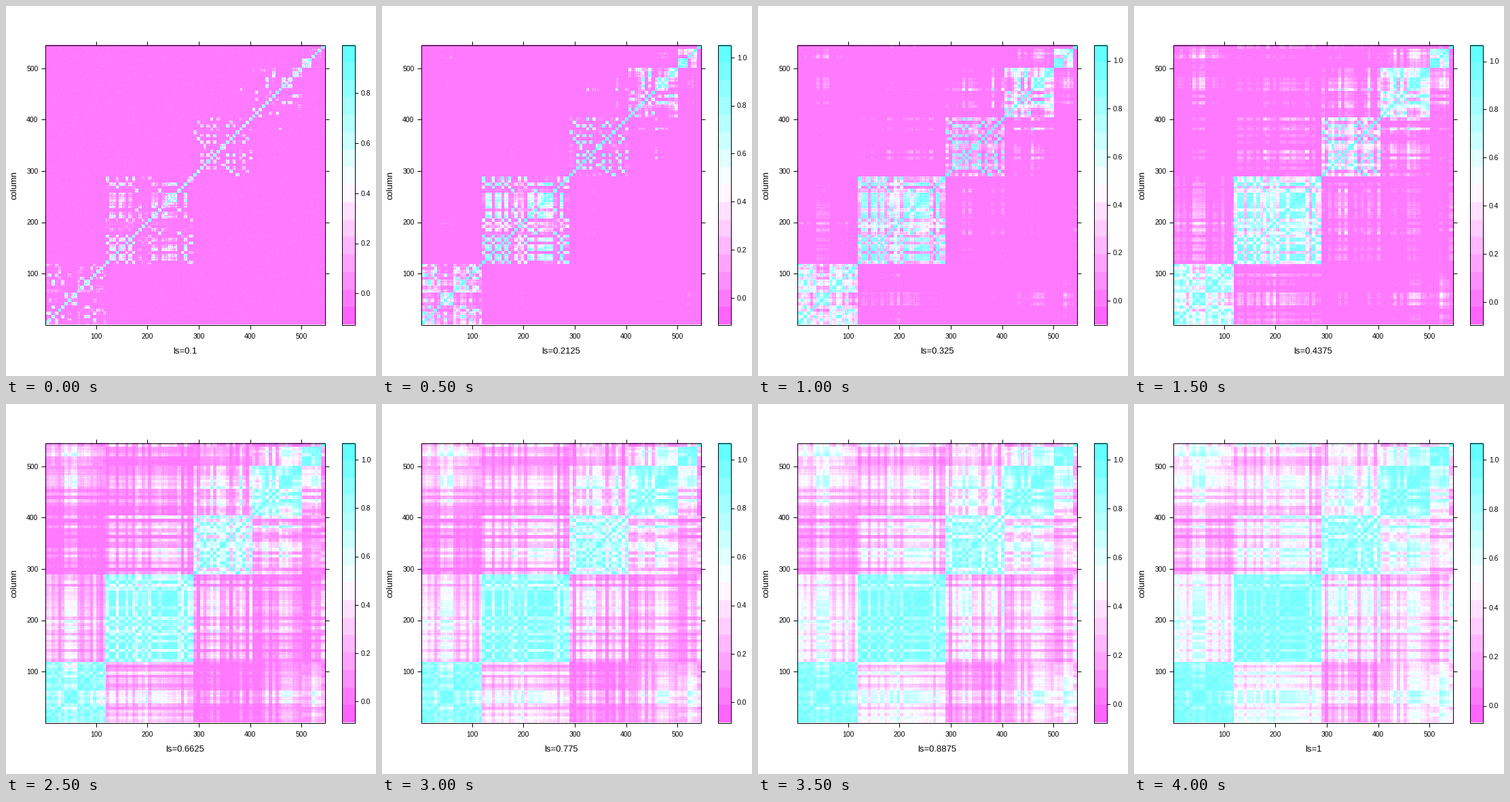
Recreate the animation shown at these times as a matplotlib script. Size 545 px wide and 545 px high, loop 4.5 s.

```python
import numpy as np
import matplotlib
import matplotlib.pyplot as plt
from matplotlib.animation import FuncAnimation
from matplotlib.patches import Rectangle

matplotlib.rcParams["font.family"] = "Liberation Sans"

SIZE, DPI = 545, 100
N = 545                      # samples in the kernel matrix
FRAMES, STEP = 9, 500
LEFT, RIGHT, TOP, BOTTOM = 57.5, 469.5, 57.5, 469.5
BAR_L, BAR_R = 494.5, 513.5
BINS, KINDS = 16, 5

# last sample of the group, its centre, spread of its kinds
GROUPS = [
    (118, (-0.9, 0.3, 0.3), 0.18),
    (289, (0.0, 1.0, -0.2), 0.18),
    (403, (1.0, 0.3, 0.0), 0.18),
    (500, (0.25, -0.1, 0.95), 0.14),
    (537, (-0.5, -0.85, 0.2), 0.14),
    (545, (-0.3, 0.1, -1.6), 0.05),
]
CORES = np.array([55, 195, 465, 530])    # samples pulled towards the middle


def make_points():
    """Clusters of about six samples; each is one of a few kinds per group."""
    rng = np.random.default_rng(7)
    points = np.zeros((N, 3))
    start = 0
    for end, centre, spread in GROUPS:
        offsets = rng.normal(0, spread, (KINDS, 3))
        scales = np.linspace(0.6, 1.3, KINDS)
        count = max(1, round((end - start) / 6.3))
        edges = np.linspace(start, end, count + 1).round().astype(int)
        for a, b in zip(edges[:-1], edges[1:]):
            kind = rng.integers(KINDS)
            pull = np.exp(-(((a + b) / 2 - CORES) / 14) ** 2).max()
            scale = max(0.5, scales[kind] - 0.4 * pull)
            place = np.array(centre) * scale + offsets[kind]
            place = place + rng.normal(0, 0.055, 3)
            points[a:b] = place + rng.normal(0, 0.04, (b - a, 3))
        start = end
    return points


def make_speckle():
    n = np.random.default_rng(3).normal(size=(N, N))
    n = np.triu(n) + np.triu(n, 1).T
    return np.clip(0.0015 * n ** 3, -0.04, 0.1)


def make_palette():
    fade = np.linspace(100, 246, BINS // 2).round().astype(np.uint8)
    full = np.full_like(fade, 255)
    pink = np.stack([full, fade, full], axis=1)
    cyan = np.stack([fade, full, full], axis=1)[::-1]
    return np.vstack([pink, cyan])


points = make_points()
dist2 = ((points[:, None] - points[None]) ** 2).sum(axis=2)
speckle = make_speckle()
palette = make_palette()


def length_scale(i):
    return 0.1 + 0.1125 * i


def value_range(i):
    low = np.interp(i, [0, 2, 6, 8], [-0.125, -0.099, -0.084, -0.069])
    return low, 1.069 - 0.077 * np.exp(-1.5 * i)


def kernel_image(i):
    low, high = value_range(i)
    k = min(1, high - 0.07) * np.exp(-dist2 / (2 * length_scale(i) ** 2))
    k = k + speckle * max(0, 1 - i / 3)
    bins = ((k - low) / (high - low) * BINS).astype(int)
    return palette[np.clip(bins, 1, BINS - 1)]


fig = plt.figure(figsize=(SIZE / DPI, SIZE / DPI), dpi=DPI, facecolor="white")
ax = fig.add_axes([0, 0, 1, 1])
ax.axis("off")


def px(size):
    return size * 72 / DPI


def line(x0, y0, x1, y1):
    return ax.plot([x0, x1], [y0, y1], color="black", lw=px(1),
                   solid_capstyle="butt")[0]


def label(x, y, text, size, ha="center", **kw):
    return ax.text(x, y, text, fontsize=px(size), ha=ha, color="black", **kw)


def raster(rgb, x0, x1):
    ax.add_patch(Rectangle((x0, TOP), x1 - x0, BOTTOM - TOP, fill=False,
                           ec="black", lw=px(1), zorder=3))
    return ax.imshow(rgb, extent=(x0, x1, BOTTOM, TOP), origin="lower",
                     interpolation="nearest", aspect="auto")


heat = raster(kernel_image(0), LEFT, RIGHT)
raster(palette[:, None], BAR_L, BAR_R)
ax.set_xlim(0, SIZE)
ax.set_ylim(SIZE, 0)

for v in range(100, 501, 100):
    d = (v - 0.5) * (RIGHT - LEFT) / N
    x, y = LEFT + d, BOTTOM - d
    line(x, TOP - 6, x, TOP)
    line(x, BOTTOM, x, BOTTOM + 6)
    line(LEFT - 6, y, LEFT, y)
    line(RIGHT, y, RIGHT + 6, y)
    label(x, 490.5, str(v), 10.4, va="baseline")
    label(47.5, y + 3.8, str(v), 10.4, ha="right", va="baseline")

label(12.5, 264, "column", 13, va="center", rotation=90)
caption = label(264, 512, "", 13, va="baseline")

bar_ticks = [(v, line(BAR_R, 0, BAR_R + 5, 0),
              label(523, 0, f"{v:.1f}", 10.4, ha="left", va="baseline"))
             for v in np.arange(6) / 5]


def update(i):
    low, high = value_range(i)
    heat.set_data(kernel_image(i))
    caption.set_text(f"ls={length_scale(i):.6g}")
    for v, tick, text in bar_ticks:
        y = BOTTOM - (v - low) / (high - low) * (BOTTOM - TOP)
        tick.set_ydata([y, y])
        text.set_y(y + 3.8)
        tick.set_visible(v <= high)
        text.set_visible(v <= high)
    return [heat, caption]


anim = FuncAnimation(fig, update, frames=FRAMES, interval=STEP,
                     repeat=True, repeat_delay=0, blit=False)
plt.show()
```
